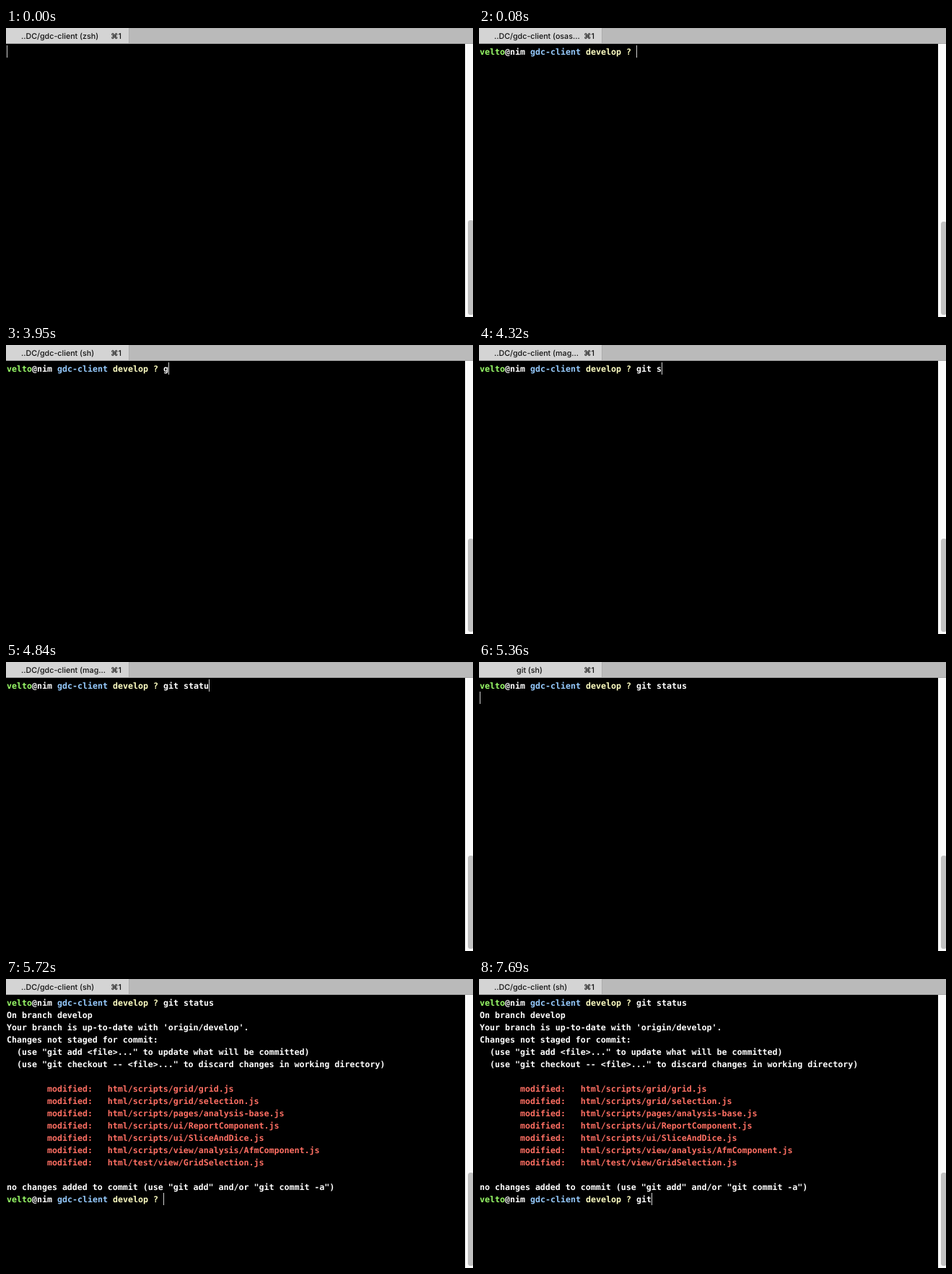
An HTML page for the animation above (8000 ms loop, 647 by 400 pixels).

```html
<!DOCTYPE html>
<html lang="en">
<head>
<meta charset="utf-8">
<title>Terminal: git status</title>
<style>
html, body { margin: 0; width: 100%; height: 100%; overflow: hidden; background: #000; }
svg { display: block; }
text { white-space: pre; text-rendering: geometricPrecision; }
.ui { font: 500 10.7px Inter, sans-serif; fill: #111; }
.term { font: bold 11.627px "DejaVu Sans Mono", monospace; }
</style>
</head>
<body>
<svg width="647" height="400" viewBox="0 0 647 400">
  <rect width="647" height="400" fill="#000"/>
  <rect width="647" height="22" fill="#bababa"/>
  <rect width="647" height="1" fill="#b0b0b0"/>
  <rect width="171" height="22" fill="#d4d4d4"/>
  <rect x="170" width="1" height="22" fill="#acacac"/>
  <rect y="21" width="647" height="1" fill="#a6a6a6"/>
  <text id="title" class="ui" y="15"></text>
  <text class="ui" x="145" y="15">⌘1</text>
  <rect x="636" y="22" width="11" height="378" fill="#fafafa"/>
  <rect id="thumb" x="640" width="8" rx="3.5" fill="#c1c1c1"/>
  <g id="screen" class="term"></g>
  <rect id="cursor" width="1" height="17" fill="#d0d0d0"/>
</svg>
<script>
const LOOP = 8000, CELL = 7, LINE = 17;
const WHITE = '#fff', GREEN = '#99fb68', BLUE = '#96cbfe', YELLOW = '#ffffc2', RED = '#ff6f63';
const PROMPT_COLS = 31, END_ROW = 16;
const $ = id => document.getElementById(id);
const title = $('title'), thumb = $('thumb'), screen = $('screen'), cursor = $('cursor');

function set(el, attrs) {
  for (const key in attrs) el.setAttribute(key, attrs[key]);
  return el;
}

function put(parent, row, col, text, fill = WHITE) {
  const el = document.createElementNS('http://www.w3.org/2000/svg', 'text');
  set(el, { x: 1 + col * CELL, y: 37 + row * LINE, fill }).textContent = text;
  return parent.appendChild(el);
}

function group() {
  return screen.appendChild(document.createElementNS('http://www.w3.org/2000/svg', 'g'));
}

// Prompt line with an editable command after it
function makePrompt(row) {
  const g = group();
  put(g, row, 0, 'velto', GREEN);
  put(g, row, 5, '@nim');
  put(g, row, 10, 'gdc-client', BLUE);
  put(g, row, 21, 'develop ?', YELLOW);
  return { g, command: put(g, row, PROMPT_COLS, '') };
}

const first = makePrompt(0), second = makePrompt(END_ROW), output = group();

[
  'On branch develop',
  "Your branch is up-to-date with 'origin/develop'.",
  'Changes not staged for commit:',
  '  (use "git add <file>..." to update what will be committed)',
  '  (use "git checkout -- <file>..." to discard changes in working directory)'
].forEach((line, i) => put(output, i + 1, 0, line));

[
  'scripts/grid/grid.js',
  'scripts/grid/selection.js',
  'scripts/pages/analysis-base.js',
  'scripts/ui/ReportComponent.js',
  'scripts/ui/SliceAndDice.js',
  'scripts/view/analysis/AfmComponent.js',
  'test/view/GridSelection.js'
].forEach((file, i) => put(output, i + 7, 8, 'modified:   html/' + file, RED));

put(output, 15, 0, 'no changes added to commit (use "git add" and/or "git commit -a")');

// Each entry: [start in ms, value]
const DIR = '..DC/gdc-client ';
const titles = [
  [0, DIR + '(zsh)'], [80, DIR + '(osas…'], [3900, DIR + '(sh)'], [4320, DIR + '(mag…'],
  [5360, 'git (sh)'], [5540, 'git (magick)'], [5640, DIR + '(zsh)'], [5720, DIR + '(sh)']
];
const typed = [
  [0, 0], [3900, 1], [3990, 3], [4070, 4], [4320, 5], [4460, 6],
  [4540, 7], [4690, 8], [4840, 9], [5260, 10]
];
const retyped = [[0, 0], [7630, 2], [7690, 3]];

const at = (steps, t) => steps.filter(([start]) => start <= t).pop()[1];
const show = (el, on) => set(el, { visibility: on ? 'visible' : 'hidden' });

function cursorCell(t, n, m) {
  if (t < 80) return [0, 0];
  if (t < 5360) return [0, PROMPT_COLS + n];
  if (t < 5540) return [1, 0];
  return [END_ROW, t < 5640 ? 0 : PROMPT_COLS + m];
}

function render(t) {
  const name = at(titles, t), wide = name.startsWith('..');
  set(title, { x: wide ? 21 : 70, 'text-anchor': wide ? 'start' : 'middle' }).textContent = name;

  const top = t < 80 ? 266 : 268;
  set(thumb, { y: top, height: 397 - top });

  const n = at(typed, t), m = at(retyped, t);
  first.command.textContent = 'git status'.slice(0, n);
  second.command.textContent = 'git'.slice(0, m);
  show(first.g, t >= 80);
  show(output, t >= 5540);
  show(second.g, t >= 5640);

  const [row, col] = cursorCell(t, n, m);
  set(cursor, { x: 1 + col * CELL, y: 24 + row * LINE });
}

const begin = performance.now();
function tick() {
  render((performance.now() - begin) % LOOP);
  requestAnimationFrame(tick);
}
tick();
</script>
</body>
</html>
```
